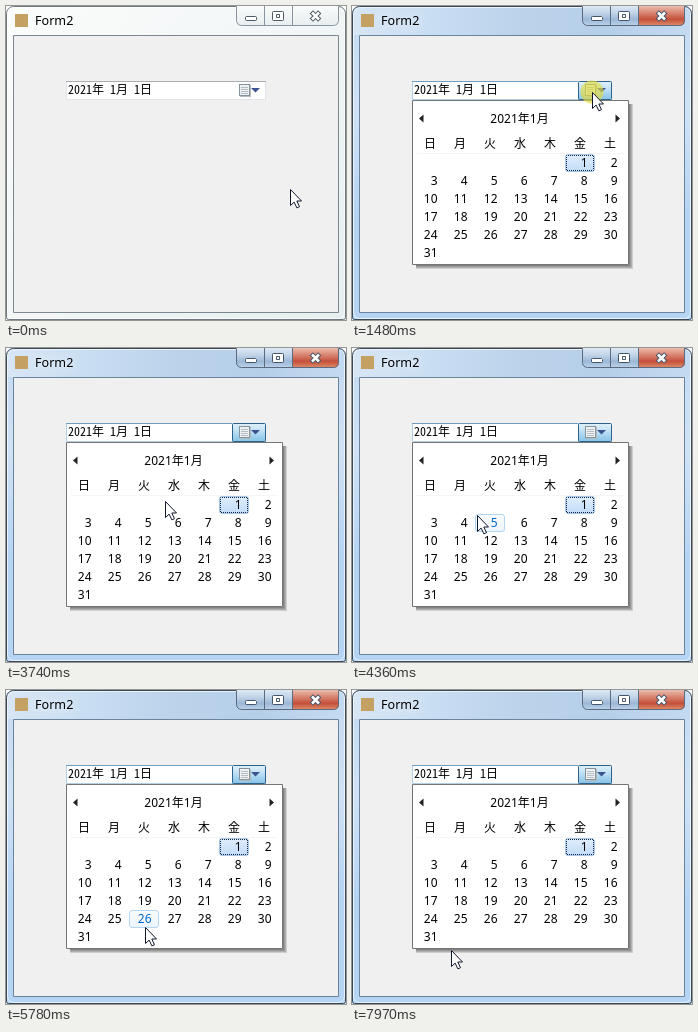
Recreate the animation shown at these times as an HTML page with a canvas. Size 340 px wide and 314 px high, loop 8000 ms.

```html
<!DOCTYPE html>
<html lang="ja">
<head>
<meta charset="utf-8">
<style>
html, body { margin: 0; width: 100%; height: 100%; overflow: hidden; background: #fff; }
canvas { display: block; }
</style>
</head>
<body>
<canvas id="stage" width="340" height="314"></canvas>
<script>
const c = document.getElementById('stage').getContext('2d');
const LOOP = 8000, OPEN = 1480, CLICK_END = 1560, TICK = 78;
const UI = '"Noto Sans", "Noto Sans CJK JP", sans-serif';
const MONO = '"Noto Sans Mono CJK JP", "Noto Sans CJK JP", monospace';

// Mouse moves: start, end, then the corners of the path, evenly spaced in time
const HOME = [284, 183];
const MOVES = [
  [400, 830, [240, 86]],
  [2170, 2560, [138, 159]],
  [2810, 3580, [126, 160], [42, 157], [205, 149]],
  [3660, 4360, [90, 158], [125, 167]],
  [4440, 4440, [84, 164]],
  [4540, 4540, [82, 164]],
  [4990, 5780, [80, 235], [90, 250], [139, 237]],
  [5850, 6610, [272, 254], [132, 253]],
  [6690, 6930, [109, 253], [94, 253]],
  [7250, 7970, [67, 266], [99, 260]]
];

function along(path, f) {
  const s = f * (path.length - 1);
  const i = Math.min(Math.floor(s), path.length - 2);
  return path[i].map((v, axis) => Math.round(v + (path[i + 1][axis] - v) * (s - i)));
}

// The mouse is sampled in ticks; the first sample has already moved
function pointer(t) {
  let pos = HOME;
  for (const [start, end, ...corners] of MOVES) {
    if (t < start) break;
    const gaps = Math.round((end - start) / TICK);
    const done = Math.min(gaps, Math.floor((t - start) / (end - start || 1) * gaps + 0.1));
    pos = along([pos, ...corners], (done + 1) / (gaps + 1));
  }
  return pos;
}

function rect(x, y, w, h, color) {
  c.fillStyle = color;
  c.fillRect(x, y, w, h);
}

function frame(x, y, w, h, color, r = 0) {
  c.beginPath();
  c.roundRect(x + 0.5, y + 0.5, w - 1, h - 1, r);
  c.strokeStyle = color;
  c.lineWidth = 1;
  c.stroke();
}

function poly(points, fill, stroke) {
  c.beginPath();
  points.forEach(([x, y]) => c.lineTo(x, y));
  c.closePath();
  c.fillStyle = fill;
  c.fill();
  if (stroke) {
    c.strokeStyle = stroke;
    c.lineWidth = 1;
    c.stroke();
  }
}

function grad(x0, y0, x1, y1, ...stops) {
  const g = c.createLinearGradient(x0, y0, x1, y1);
  stops.forEach((s, i) => g.addColorStop(i / (stops.length - 1), s));
  return g;
}

const down = (y, h, ...stops) => grad(0, y, 0, y + h, ...stops);

function text(s, x, y, font, color = '#000', align = 'left') {
  c.font = font;
  c.textAlign = align;
  c.fillStyle = color;
  c.fillText(s, x, y);
}

function cross(x, y, r, width, color) {
  c.beginPath();
  for (const d of [-r, r]) {
    c.moveTo(x - r, y - d);
    c.lineTo(x + r, y + d);
  }
  c.lineWidth = width;
  c.strokeStyle = color;
  c.stroke();
}

function captionButtons(active) {
  const line = active ? '#5a6b80' : '#8a949d';
  const glyph = active ? '#46546a' : '#4e5963';
  c.save();
  c.beginPath();
  c.roundRect(230, -5, 103, 25, 5);
  c.clip();
  rect(230, 0, 103, 20, active
    ? down(0, 20, '#dde8f4', '#c3d5e9', '#9cb8d6', '#bdd4ec')
    : down(0, 20, '#fafcfc', '#f0f4f5', '#e8eef0'));
  if (active) rect(287, 0, 46, 20, down(0, 20, '#ecbcae', '#d98673', '#c4503a', '#e0906c'));
  c.restore();
  frame(230, -5, 103, 25, line, 5);
  rect(258, 0, 1, 19, line);
  rect(286, 0, 1, 19, line);
  rect(240, 10, 11, 4, '#fff');
  frame(239, 10, 12, 5, glyph, 1);
  rect(267, 6, 10, 8, '#fff');
  frame(266, 5, 12, 10, glyph, 1);
  frame(270, 8, 4, 4, glyph);
  cross(309.5, 10, 4.2, 4.6, glyph);
  cross(309.5, 10, 3.5, 2.6, '#fff');
}

function drawWindow(active) {
  rect(0, 0, 340, 314, '#fff');
  c.beginPath();
  c.roundRect(0, 0, 340, 314, [7, 7, 2, 2]);
  c.fillStyle = active
    ? down(0, 314, '#c4daf1', '#cfe2f6', '#b5d4f4', '#b6d5f5')
    : grad(0, 0, 340, 314, '#fbfcfc', '#f2f6f6', '#e6eff0');
  c.fill();
  if (active) rect(2, 2, 336, 27, grad(0, 0, 340, 0, '#d8e6f5', '#c8ddf2', '#bbd2ea', '#b6cfe9', '#c4daf1'));
  frame(1, 1, 338, 312, 'rgba(255,255,255,.7)', 6);
  frame(0, 0, 340, 314, active ? '#3a4856' : '#70787e', [7, 7, 2, 2]);
  frame(7, 29, 326, 278, active ? '#6c849b' : '#7c878f');
  rect(8, 30, 324, 276, '#f0f0f0');
  rect(9, 8, 13, 13, '#c4a163');
  c.shadowColor = 'rgba(255,255,255,.9)';
  c.shadowBlur = 8;
  text('Form2', 29, 19, '12.6px ' + UI);
  c.shadowColor = 'transparent';
  captionButtons(active);
}

function drawPicker(hot, open) {
  rect(60, 75, 200, 19, '#fff');
  frame(60, 75, 200, 19, hot ? '#b5cfe7' : '#e2e3ea');
  rect(60, 75, 200, 1, hot ? '#6f9dbf' : '#abadb3');
  text('2021年 1月 1日', 62, 88, '12px ' + MONO);
  if (hot) {
    rect(226, 75, 34, 19, open
      ? down(75, 19, '#e0f1fb', '#c9e5f6', '#a4d3f0', '#86c1e6')
      : down(75, 19, '#eaf6fd', '#d9f0fc', '#bee6fd', '#a7d9f5'));
    frame(226, 75, 34, 19, open ? '#2c628b' : '#3c7fb1', 1);
  }
  rect(234, 79, 11, 12, '#b4bcc0');
  rect(233, 78, 11, 12, '#86929a');
  rect(234, 79, 9, 10, '#eef2f3');
  for (let y = 81; y < 89; y += 2) rect(235, y, 7, 1, '#b3bdc3');
  poly([[245, 82], [254, 82], [249.5, 86.5]], '#3c5490');
}

function drawCell(x, y, selected) {
  c.beginPath();
  c.roundRect(x + 0.5, y + 0.5, 29, 17, 2.5);
  c.fillStyle = selected
    ? down(y, 18, '#e1eefc', '#c0dbf8')
    : down(y, 18, '#fbfdff', '#ebf4fd');
  c.fill();
  frame(x, y, 30, 18, selected ? '#a3c6ea' : '#b3d6f5', 2.5);
  if (!selected) return;
  c.setLineDash([1, 1]);
  c.lineDashOffset = 0.5;
  frame(x + 1, y + 1, 28, 16, '#14243a');
  c.setLineDash([]);
}

function drawCalendar(mx, my) {
  for (let i = 1; i <= 4; i++) rect(64, 98, 213 + i, 161 + i, 'rgba(0,0,0,.14)');
  rect(60, 94, 217, 165, '#fff');
  frame(60, 94, 217, 165, '#747474');
  poly([[67, 112.5], [71.5, 108.5], [71.5, 116.5]], '#222');
  poly([[268, 112.5], [263.5, 108.5], [263.5, 116.5]], '#222');
  text('2021年1月', 167.5, 117, '12px ' + UI, '#000', 'center');
  [...'日月火水木金土'].forEach((d, i) =>
    text(d, 78 + 30 * i, 142, '12px ' + UI, '#000', 'center'));
  rect(65, 147, 207, 1, '#f5f5f5');

  const overCol = Math.floor((mx - 63) / 30), overRow = Math.floor((my - 148) / 18);
  for (let day = 1; day <= 31; day++) {
    const col = (day + 4) % 7, row = Math.floor((day + 4) / 7);
    const x = 63 + 30 * col, y = 148 + 18 * row;
    const hover = day > 1 && col === overCol && row === overRow;
    if (day === 1 || hover) drawCell(x, y, day === 1);
    text(day, x + 22.5, y + 13, '12px ' + UI, hover ? '#0066cc' : '#000', 'right');
  }
}

function drawPointer(x, y) {
  const shape = [[0, 0], [0, 16], [3.6, 12.6], [6.4, 18.4], [9, 17.2], [6.3, 11.5], [11, 11.5]];
  poly(shape.map(([px, py]) => [x + px + 0.5, y + py + 0.5]), '#fff', '#12182c');
}

function draw(t) {
  const [x, y] = pointer(t);
  const open = t >= OPEN;
  const hot = open || (x >= 60 && x < 260 && y >= 75 && y < 94);
  drawWindow(open);
  drawPicker(hot, open);
  if (open) drawCalendar(x, y);
  if (open && t < CLICK_END) {
    c.beginPath();
    c.arc(240, 86, 11.5, 0, 7);
    c.fillStyle = 'rgba(226,220,60,.65)';
    c.fill();
  }
  drawPointer(x, y);
}

function tick() {
  draw(performance.now() % LOOP);
  requestAnimationFrame(tick);
}
tick();
</script>
</body>
</html>
```
